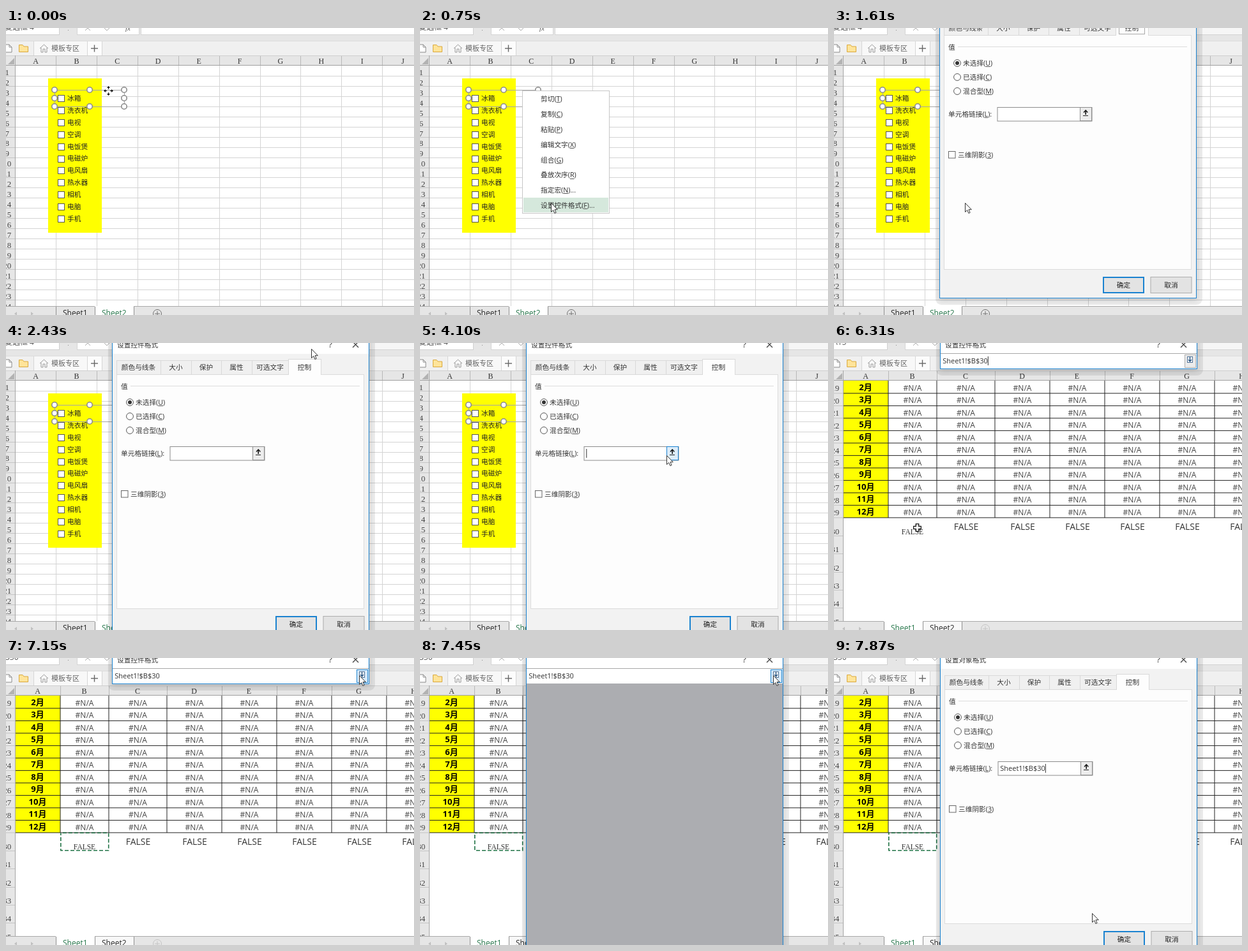
An HTML page with a canvas for the animation above (7990 ms loop, 639 px wide and 450 px high).

```html
<!DOCTYPE html>
<html lang="zh">
<head>
<meta charset="utf-8">
<title>Spreadsheet checkbox link</title>
<style>
html, body { margin: 0; width: 100%; height: 100%; overflow: hidden; background: #fff; }
canvas { display: block; }
</style>
</head>
<body>
<canvas id="stage" width="639" height="450"></canvas>
<script>
const W = 639, H = 450, LOOP = 7990;
const ctx = document.getElementById('stage').getContext('2d');
const UI = '"Open Sans", "Noto Sans CJK SC", "Noto Sans CJK", sans-serif';
const CJK = '"Noto Sans CJK SC", "Noto Sans CJK", sans-serif';
const SERIF = '"Liberation Serif", serif';
const BLUE = '#1a82d0', GREEN = '#217346', INK = '#333';

// ---- drawing helpers ----
function box(x, y, w, h, fill, stroke, lw = 1) {
  if (fill) { ctx.fillStyle = fill; ctx.fillRect(x, y, w, h); }
  if (stroke) {
    ctx.strokeStyle = stroke;
    ctx.lineWidth = lw;
    ctx.strokeRect(x + lw / 2, y + lw / 2, w - lw, h - lw);
  }
}
const hline = (x0, x1, y, c) => box(x0, y, x1 - x0, 1, c);
const vline = (x, y0, y1, c) => box(x, y0, 1, y1 - y0, c);

function text(s, x, y, size, color = INK, align = 'left', family = UI, weight = 400) {
  ctx.font = `${weight} ${size}px ${family}`;
  ctx.fillStyle = color;
  ctx.textAlign = align;
  ctx.textBaseline = 'alphabetic';
  ctx.fillText(s, x, y + size * 0.37);
}

function path(points, color, lw = 1, fill, close) {
  ctx.beginPath();
  points.forEach(([x, y], i) => i ? ctx.lineTo(x, y) : ctx.moveTo(x, y));
  if (close) ctx.closePath();
  if (fill) { ctx.fillStyle = fill; ctx.fill(); }
  if (color) { ctx.strokeStyle = color; ctx.lineWidth = lw; ctx.stroke(); }
}

function ring(x, y, r, fill, stroke, lw = 1) {
  ctx.beginPath();
  ctx.arc(x, y, r, 0, 7);
  if (fill) { ctx.fillStyle = fill; ctx.fill(); }
  if (stroke) { ctx.strokeStyle = stroke; ctx.lineWidth = lw; ctx.stroke(); }
}

// Label followed by an underlined access key in brackets
function keyed(label, key, x, y, tail = '') {
  const size = 10.7;
  text(`${label}(${key})${tail}`, x, y, size);
  const left = x + ctx.measureText(label + '(').width;
  hline(left, left + ctx.measureText(key).width, Math.round(y) + 5, '#555');
}

// ---- window frame ----
function topBars(t) {
  box(0, 0, W, 43, '#e6e6e6');
  box(-1, -5, 85, 16, '#fff', '#d0d0d0');
  text(t < 5490 ? '复选框 4' : t < 6460 ? 'A15' : 'B30', -2, -1, 12, '#555');
  box(97, 3, 1, 1, '#888');
  box(111, -5, 98, 16, '#fff', '#d4d4d4');
  box(211, -5, 430, 16, t < 1310 ? '#fff' : '#f6f6f6', '#d4d4d4');
  path([[124, 4], [128, 0], [132, 4]], '#aaa');
  path([[154, 0], [158, 4], [162, 0]], '#aaa');
  text('fx', 187, 0, 11, '#555', 'left', SERIF, 'italic');
  box(0, 20, W, 23, '#f0f0f0');
  box(43, 20, 84, 23, '#f8f8f8');
  box(128, 20, 22, 23, '#fcfcfc');
  for (const x of [43, 127, 150]) vline(x, 20, 43, '#d6d6d6');
  hline(0, W, 20, '#dcdcdc');
  path([[-2, 26], [5, 26], [9, 30], [9, 38], [-2, 38]], '#888', 1, '#fff');
  path([[5, 26], [5, 30], [9, 30]], '#888');
  path([[20.5, 37.5], [20.5, 26.5], [26, 26.5], [28, 29], [34.5, 29], [34.5, 37.5]], '#d9a83c', 1, '#ffe49a', true);
  path([[53, 32], [59.5, 26], [66, 32]], '#999');
  path([[55, 31], [55, 38], [58, 38], [58, 33], [61, 33], [61, 38], [64, 38], [64, 31]], '#999');
  text('模板专区', 71, 32, 11, '#666', 'left', CJK);
  path([[133, 32], [144, 32]], '#666', 1.4);
  path([[138.5, 26.5], [138.5, 37.5]], '#666', 1.4);
}

function headers(cols) {
  box(0, 43, W, 16, '#e6e6e6');
  box(0, 59, 15, 377, '#e6e6e6');
  path([[13, 47], [13, 57], [3, 57]], null, 1, '#b2b2b2', true);
  cols.forEach(([name, mid, right]) => {
    text(name, mid, 52, 12, '#333', 'center', SERIF);
    vline(right, 44, 59, '#b8b8b8');
  });
  hline(0, W, 43, '#cfcfcf');
  hline(0, W, 58, '#9f9f9f');
  vline(14, 43, 436, '#a5a5a5');
}

function rowLabel(n, y, bottom) {
  text(n, 1.8, y, 13, '#444', 'center', SERIF);
  hline(0, 14, bottom, '#c4c4c4');
}

function tabBar(active, dim) {
  box(0, 436, W, 14, '#e6e6e6');
  hline(0, W, 436, '#a9a9a9');
  path([[17, 445], [13, 448], [17, 451]], null, 1, '#c0c0c0');
  path([[39, 445], [43, 448], [39, 451]], null, 1, '#c0c0c0');
  [1, 2].forEach(n => {
    const x = n === 1 ? 78 : 139, on = n === active;
    // the second tab stays light even when it is not the active one
    if (on || n === 2) box(x, on ? 436 : 437, 61, 14, on ? '#fff' : '#f8f8f8');
    vline(x, 437, 450, '#8f8f8f');
    vline(x + 61, 437, 450, '#8f8f8f');
    text('Sheet' + n, x + 11, 447, 12, on ? GREEN : '#222');
  });
  const c = dim ? '#c4c4c4' : '#707070';
  ring(237, 448, 6.5, null, c);
  path([[233, 448], [241, 448]], c);
  path([[237, 444], [237, 452]], c);
}

// ---- sheets ----
const ITEMS = ['冰箱', '洗衣机', '电视', '空调', '电饭煲', '电磁炉', '电风扇', '热水器', '相机', '电脑', '手机'];

function listSheet(fade) {
  box(0, 43, W, 393, '#fff');
  const cols = [...'ABCDEFGHIJ'].map((c, i) => [c, 46.5 + i * 63.9, Math.round(78 + i * 63.9)]);
  const rowY = i => Math.round(59 + i * 15.95);
  for (const c of cols) vline(c[2], 59, 436, '#d4d4d4');
  for (let i = 1; i < 24; i++) hline(15, W, rowY(i), '#d4d4d4');
  headers(cols);
  for (let i = 1; i <= 24; i++) rowLabel(i, 69 + (i - 1) * 15.95, rowY(i));

  ctx.globalAlpha = fade ? 0.62 : 1;
  box(66, 79, 84, 242, '#ffff00');
  ITEMS.forEach((name, i) => {
    const y = 110 + i * 18.9;
    box(81, Math.round(y) - 5, 11, 11, '#fff', '#555');
    text(name, 96, y, 10.7, '#222', 'left', CJK);
  });
  box(76, 97, 110, 27, null, '#a6a6a6');
  for (const x of [76, 131, 185])
    for (const y of [97, 110, 123])
      if (x !== 131 || y !== 110) ring(x, y, 4.2, '#fff', '#8a8a8a', 1.6);
  ctx.globalAlpha = 1;
}

const EDGES = [15, 85, 161, 252, 338, 424, 510, 596, 682];

function monthSheet(t) {
  box(0, 43, W, 393, '#fff');
  const mid = i => (EDGES[i] + EDGES[i + 1]) / 2;
  headers([...'ABCDEFGH'].map((c, i) => [c, mid(i) - 0.5, EDGES[i + 1]]));
  box(15, 59, 70, 215, '#ffff00');
  for (let r = 0; r < 11; r++) {
    const y = 69.5 + r * 19.5, bottom = 78.4 + r * 19.5;
    rowLabel(19 + r, y + 1, bottom);
    text(r + 2 + '月', 49.5, y - 0.5, 13, '#000', 'center', UI, 700);
    for (let i = 1; i < 8; i++) text('#N/A', mid(i), y + 1, 12, '#444', 'center');
    hline(15, W, bottom, '#222');
  }
  for (let i = 1; i < 8; i++) vline(EDGES[i] - 0.5, 59, 274, '#222');
  for (let r = 0; r < 6; r++) rowLabel(30 + r, 295 + r * 28.4, Math.round(302 + r * 28.3));
  text('FALSE', 123, 296, 11.5, '#333', 'center', SERIF);
  for (let i = 2; i < 8; i++) text('FALSE', mid(i) + 0.5, 287.5, 14, '#333', 'center');
  if (t >= 6460) {
    ctx.setLineDash([6, 3]);
    ctx.lineDashOffset = -Math.floor(t / 140) * 2;
    box(85, 273.5, 76.5, 29, null, GREEN, 1.6);
    ctx.setLineDash([]);
  }
}

// ---- context menu ----
const MENU = [['剪切', 'T'], ['复制', 'C'], ['粘贴', 'P'], ['编辑文字', 'X'], ['组合', 'G'],
  ['叠放次序', 'R'], ['指定宏', 'N', '...'], ['设置控件格式', 'F', '...']];

function menu(y) {
  box(160, 98, 137, 193, '#fff', '#c6c6c6');
  MENU.forEach(([label, key, tail], i) => {
    const top = 99 + i * 23.9;
    if (y > top && y < top + 23.9) box(162, Math.round(top), 133, 23, '#d5e8dc');
    keyed(label, key, 189, top + 12, tail);
  });
}

// ---- dialog ----
function frame(bottom, fill) {
  ctx.save();
  ctx.fillStyle = 'rgba(0,0,0,.08)';
  ctx.beginPath();
  ctx.roundRect(160, -20, 418, bottom + 30, 9);
  ctx.fill();
  ctx.shadowColor = 'rgba(0,0,0,.16)';
  ctx.shadowBlur = 8;
  ctx.shadowOffsetY = 2;
  box(166, -40, 403, bottom + 40, fill);
  ctx.restore();
  box(166, -40, 403, bottom + 40, null, BLUE);
}

function titleBar(title) {
  box(167, -39, 401, 56, '#fff');
  text(title, 174, 3, 10.7);
  text('?', 508, 2, 13, '#333', 'center');
  path([[543, -2], [552, 7]], '#333', 1.1);
  path([[552, -2], [543, 7]], '#333', 1.1);
}

// Input text with an optional caret after it
function entry(value, x, y, caret) {
  text(value, x, y, 11);
  if (caret) vline(x + ctx.measureText(value).width, y - 7, y + 7, '#333');
}

function refBar(value, title, hot) {
  titleBar(title);
  box(167, 17, 401, 23, '#fff');
  hline(167, 568, 16, '#a8a8a8');
  entry(value, 170.3, 28, !hot);
  box(549, 18, 18, 21, hot ? '#d9ebf9' : '#ececec', hot ? BLUE : '#adadad');
  box(553, 21, 9, 10, '#fff', '#4d6f94');
  path([[557.5, 22], [557.5, 28]], '#24527f', 1.4);
  path([[555, 26], [557.5, 29], [560, 26]], '#24527f', 1.2);
}

function button(x, label, main) {
  box(x, 428, 65, 26, '#e3e3e3', main ? BLUE : '#adadad', main ? 2 : 1);
  text(label, x + 32.5, 441, 10.7, '#222', 'center');
}

const TABS = [['颜色与线条', 173], ['大小', 242], ['保护', 290], ['属性', 337], ['可选文字', 385], ['控制', 442]];

function dialog(dy, o) {
  ctx.save();
  ctx.translate(dy < 0 ? -1 : 0, dy);
  frame(462, '#f2f2f2');
  titleBar(o.title);
  box(173, 49, 388, 368, '#fdfdfd', '#dcdcdc');
  TABS.forEach(([label, x], i) => {
    const right = i < 5 ? TABS[i + 1][1] : 493, on = i === 5;
    box(x, on ? 25 : 27, right - x + 1, on ? 25 : 23, on ? '#fdfdfd' : '#f0f0f0', '#d9d9d9');
    if (on) box(x + 1, 48, right - x - 1, 4, '#fdfdfd');
    text(label, (x + right) / 2, 38, 10.7, INK, 'center');
  });
  if (o.focusTab) {
    ctx.setLineDash([1, 1]);
    box(447, 29, 41, 19, null, '#555');
    ctx.setLineDash([]);
  }
  text('值', 180, 68, 10.7);
  hline(195, 554, 67, '#dcdcdc');
  [['未选择', 'U'], ['已选择', 'C'], ['混合型', 'M']].forEach(([label, key], i) => {
    const y = 93 + i * 22;
    ring(194, y, 5.4, '#fff', '#555');
    if (!i) ring(194, y, 3, '#333');
    keyed(label, key, 203, y);
  });
  keyed('单元格链接', 'L', 180, 173, ':');
  box(256.5, 162, 149, 22.5, '#fff', '#8c8c8c');
  entry(o.value, 260.3, 173, o.caret);
  box(386, 162, 19, 22, o.hot ? '#dcecf9' : '#ececec', o.hot ? BLUE : '#8c8c8c');
  path([[395.2, 174], [395.2, 167]], '#111', 1.6);
  path([[392, 170.5], [395.2, 167], [398.4, 170.5]], '#111', 1.4);
  hline(391, 399, 175, '#222');
  box(180, 231, 11.5, 11.5, '#fff', '#666');
  keyed('三维阴影', '3', 195, 237);
  button(422, '确定', true);
  button(496.5, '取消');
  ctx.restore();
}

// ---- pointer ----
// [start, end, steps, x0, y0, x1, y1]
const MOVES = [
  [150, 750, 5, 160, 98, 205, 274],
  [1740, 2000, 3, 205, 274, 478, -29],
  [2280, 2430, 2, 478, -29, 478, 9],
  [3260, 3680, 4, 478, 9, 345, 172],
  [3820, 4100, 3, 345, 172, 386, 176],
  [4370, 5060, 6, 386, 176, 103, 446],
  [5790, 6190, 4, 103, 446, 130, 289],
  [6460, 6730, 3, 130, 289, 440, 140],
  [6850, 7150, 3, 440, 140, 553, 27],
  [7600, 7870, 3, 553, 27, 404, 400]
];

function pointerAt(t) {
  let pos = [160, 98];
  for (const [t0, t1, n, x0, y0, x1, y1] of MOVES) {
    if (t < t0) break;
    const k = Math.min(n, 1 + Math.floor((t - t0) * (n - 1) / (t1 - t0) + 0.01)) / n;
    pos = [x0 + (x1 - x0) * k, y0 + (y1 - y0) * k];
  }
  return pos;
}

const ARROW = [[0, 0], [0, 14], [3.2, 11], [5.4, 16], [7.6, 15], [5.5, 10.2], [9.8, 10.2]];

function pointer(t, [x, y]) {
  ctx.save();
  ctx.translate(Math.round(x) + 0.5, Math.round(y) + 0.5);
  const onCells = t >= 4370 && t < 7450 && y > 41 && y < 436;
  if (t < 150) {
    for (let i = 0; i < 4; i++) {
      path([[0, -2.5], [0, -5]], '#111');
      path([[-2.5, -4.5], [0, -7.5], [2.5, -4.5]], null, 1, '#111', true);
      ctx.rotate(Math.PI / 2);
    }
  } else if (onCells) {
    const a = 2.2, b = 5.8;
    path([[-a, -b], [a, -b], [a, -a], [b, -a], [b, a], [a, a], [a, b], [-a, b], [-a, a], [-b, a], [-b, -a], [-a, -a]],
      '#111', 1.3, '#fff', true);
  } else {
    path(ARROW, '#333', 1, '#fff', true);
  }
  ctx.restore();
}

// ---- scene ----
function draw(t) {
  const pos = pointerAt(t), cells = t >= 5490;
  topBars(t);
  if (cells) monthSheet(t); else listSheet(t >= 5340);
  tabBar(cells ? 1 : 2, t >= 4370);

  const value = t < 5340 ? '' : t < 6310 ? 'Sheet1!' : 'Sheet1!$B$30';
  if (t >= 150 && t < 1030) menu(pos[1]);
  if (t >= 1310 && t < 4370) {
    const dy = t < 2280 ? -38 : t < 2430 ? -19 : 0;
    dialog(dy, { title: '设置控件格式', value: '', focusTab: t < 2280, caret: t >= 3680, hot: t >= 3960 });
  } else if (t >= 4370 && t < 7450) {
    frame(41, '#fff');
    refBar(value, '设置控件格式', t >= 7150);
  } else if (t >= 7450 && t < 7600) {
    frame(470, '#acadb1');
    refBar(value, '', true);
  } else if (t >= 7600) {
    dialog(0, { title: '设置对象格式', value, caret: true });
  }
  pointer(t, pos);
}

const start = performance.now();
function tick() {
  draw((performance.now() - start) % LOOP);
  requestAnimationFrame(tick);
}
tick();
</script>
</body>
</html>
```
